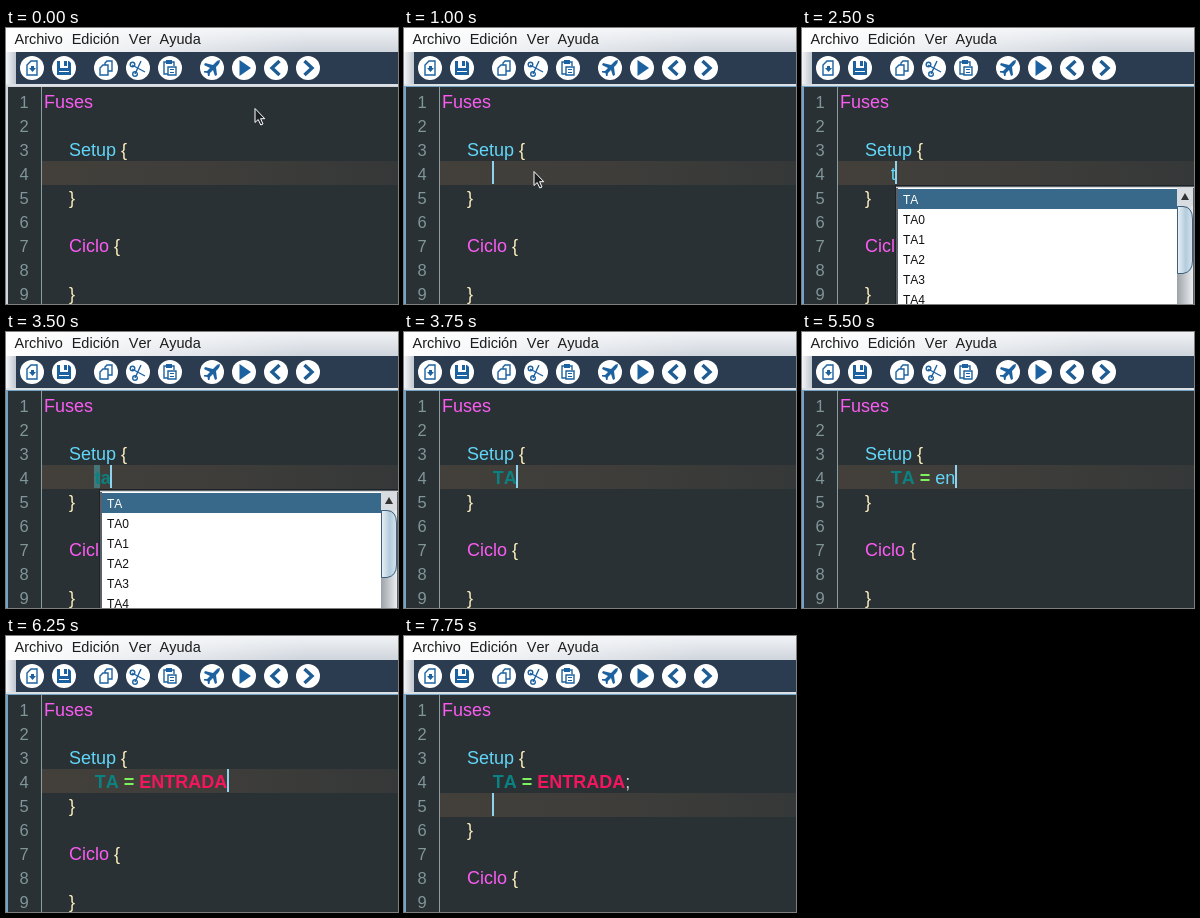
These frames come from a looping animation (392x276 px, 8 s). An HTML page:

```html
<!DOCTYPE html>
<html lang="es">
<head>
<meta charset="utf-8">
<title>Editor con autocompletado</title>
<style>
  html, body { margin: 0; width: 100%; height: 100%; overflow: hidden; background: #293134; }
  svg { display: block; width: 392px; height: 276px; font-family: "Liberation Sans", Arial, sans-serif; }
  text { font-kerning: none; white-space: pre; }
  .menu { font-size: 14.5px; fill: #1c1c1c; }
  .code { font-size: 18px; }
  .nums { font-size: 16.5px; fill: #81969a; text-anchor: end; }
  .list { font-size: 12px; fill: #111; }
  .key { fill: #fa5cf2; }
  .fn { fill: #62d6f8; }
  .brace { fill: #ffefbe; }
  .port { fill: #0b8281; font-weight: bold; }
  .op { fill: #7df25c; font-weight: bold; }
  .mode { fill: #f5155f; font-weight: bold; }
  .end { fill: #d3d8cf; }
  .solid { fill: #1d62a0; }
  .line { fill: none; stroke: #1d62a0; stroke-width: 1.4; }
  .bold { fill: none; stroke: #1d5c94; stroke-width: 3.4; }
</style>
</head>
<body>
<svg viewBox="0 0 392 276">
  <defs>
    <linearGradient id="bar" x2="0" y2="1">
      <stop offset="0" stop-color="#f0f2f5"/><stop offset=".5" stop-color="#e0e4e9"/><stop offset="1" stop-color="#ced4dc"/>
    </linearGradient>
    <linearGradient id="sheen">
      <stop offset="0" stop-color="#fff"/><stop offset="1" stop-color="#fff" stop-opacity="0"/>
    </linearGradient>
    <linearGradient id="grip">
      <stop offset="0" stop-color="#f4f5f7"/><stop offset="1" stop-color="#c0c7d0"/>
    </linearGradient>
    <linearGradient id="row">
      <stop offset="0" stop-color="#43403b"/><stop offset=".5" stop-color="#3e3d3a"/><stop offset="1" stop-color="#353838"/>
    </linearGradient>
    <linearGradient id="thumb">
      <stop offset="0" stop-color="#e9f0f5"/><stop offset=".55" stop-color="#b3cbdc"/><stop offset="1" stop-color="#d5e4ef"/>
    </linearGradient>
    <linearGradient id="track">
      <stop offset="0" stop-color="#9da2a8"/><stop offset="1" stop-color="#eceef0"/>
    </linearGradient>
  </defs>

  <!-- menu -->
  <rect width="392" height="24" fill="url(#bar)"/>
  <rect width="300" height="24" fill="url(#sheen)"/>
  <g class="menu">
    <text x="8.5" y="16">Archivo</text><text x="65.7" y="16">Edición</text>
    <text x="122.8" y="16">Ver</text><text x="153.6" y="16">Ayuda</text>
  </g>

  <!-- toolbar -->
  <rect y="24" width="392" height="32" fill="#2b3c50"/>
  <rect y="24" width="10" height="32" fill="url(#grip)"/>
  <g id="tools"></g>

  <!-- editor -->
  <rect y="56" width="392" height="220" fill="#293134"/>
  <rect id="current" y="133" x="36" width="356" height="24" fill="url(#row)"/>
  <rect x="35" y="59" width="1" height="217" fill="#8b9da1"/>
  <g id="nums" class="nums"></g>
  <rect id="mark" x="88" y="133" width="6" height="23" fill="#437579"/>
  <g class="code">
    <text x="38" y="80" class="key">Fuses</text>
    <text x="63" y="128"><tspan class="fn">Setup</tspan><tspan class="brace"> {</tspan></text>
    <text id="typed" x="88.7" y="152"></text>
    <g id="below">
      <text x="63" y="176" class="brace">}</text>
      <text x="63" y="224"><tspan class="key">Ciclo</tspan><tspan class="brace"> {</tspan></text>
      <text x="63" y="272" class="brace">}</text>
    </g>
  </g>
  <rect id="caret" width="2" height="23" fill="#8fd3ee"/>
  <rect y="56" width="392" height="2" fill="#dce1e6"/>
  <path id="frame" d="M0 58H392V59H2V276H0Z"/>

  <!-- completion list -->
  <g id="popup">
    <rect width="300" height="125" fill="#1d2327"/>
    <rect x="1" y="1" width="298" height="124" fill="#596067"/>
    <rect x="1" y="2" width="298" height="1" fill="#d3d7db"/>
    <rect x="3" y="3" width="295" height="122" fill="#fff"/>
    <rect x="3" y="4" width="279" height="20" fill="#39698a"/>
    <g id="items" class="list"></g>
    <rect x="282" y="3" width="16" height="122" fill="url(#track)"/>
    <rect x="282" y="3" width="16" height="18" fill="#d9dce0"/>
    <path d="M286 15l4-7 4 7z" fill="#333"/>
    <path d="M282.5 21.5H288Q297.5 22 297.5 34V76Q297.5 87 288 88.5H282.5Z" fill="url(#thumb)" stroke="#3b5f7d"/>
  </g>

  <path id="mouse" d="M0 0V14L3.2 11L5.8 16.5L8 15.5L5.6 10.2H9.8Z" fill="#1b1f22" stroke="#fff"/>
</svg>
<script>
const $ = id => document.getElementById(id);

// Icons are drawn around their own centre.
const icons = [
  [26, '<path class="line" d="M-1-7H5V7H-5V-3Z"/><path class="solid" d="M-1-2H2V0H4L.5 4L-3 0H-1Z"/>'],
  [58, '<path class="solid" d="M-7-7H-4V0H4V-7H5L7-5V7H-7Z"/><path class="solid" d="M0-7H3V-2H0Z"/><path fill="#fff" d="M-5 3H5V4H-5Z"/>'],
  [100, '<path class="line" d="M-1-3V-5L1-7H6V3H2M-3-3H2V7H-6V0Z"/>'],
  [132, '<path class="line" d="M-6-3L7 4M-3 6L3-7"/><circle class="line" cx="-5.5" cy="-3.5" r="2.3"/><circle class="line" cx="-3" cy="6" r="2.3"/>'],
  [164, '<path class="line" d="M-2 6H-6V-6H4V-2M-2-1H6V7H-2Z"/><path class="solid" d="M-4-8H2V-4H-4ZM0 1H4V2H0ZM0 4H4V5H0Z"/>'],
  [206, '<path class="solid" d="M8-8Q5-8 3-5L1-3L-7-5L-8-3L-2 0L-5 3L-8 3L-8 4.5L-4.5 5L-4 8L-2.5 8L-2 5L1 2L3 8L5 7L4-1L6-3Q8-5 8-8Z"/>'],
  [238, '<path class="solid" d="M-4.5-8L7 0L-4.5 8Z"/>'],
  [270, '<path class="bold" d="M3.5-7L-4 0L3.5 7"/>'],
  [302, '<path class="bold" d="M-3.5-7L4 0L-3.5 7"/>']
];
$('tools').innerHTML = icons.map(([x, art]) =>
  `<g transform="translate(${x} 40)"><circle r="12" fill="#fff"/>${art}</g>`).join('');

$('nums').innerHTML = Array.from({ length: 9 }, (_, i) =>
  `<text x="22.6" y="${80 + 24 * i}">${i + 1}</text>`).join('');

const span = (cls, s) => `<tspan class="${cls}">${s}</tspan>`;
const ta = span('port', 'TA');
const eq = ta + span('op', ' =');
const full = eq + span('mode', ' ENTRADA');
const ports = { x: 93, items: ['TA', 'TA0', 'TA1', 'TA2', 'TA3', 'TA4'] };
const modes = { x: 153, items: ['ENTRADA'] };

// start time, typed markup, caret x (0 = hidden), completion list
const steps = [
  [0, '', 0], [1000, '', 88], [1500, '', 0], [2000, '', 88],
  [2250, span('fn', 't'), 93],
  [2500, span('fn', 't'), 93, ports],
  [2750, span('fn', 't'), 0, ports],
  [3250, span('fn', 't'), 93, ports],
  [3500, span('port', 'ta'), 104, ports],
  [3750, ta, 112], [4250, ta, 0], [4500, ta, 117],
  [4750, eq, 128], [5000, eq, 133],
  [5250, eq + span('fn', ' e'), 143],
  [5500, eq + span('fn', ' en'), 153],
  [5750, eq + span('fn', ' en'), 153, modes],
  [6250, full, 221],
  [6750, full + span('end', ';'), 226],
  [7250, full + span('end', ';'), 0],
  [7500, full + span('end', ';'), 88]
];

const show = (el, on) => el.style.display = on ? '' : 'none';
const move = (el, x, y) => el.setAttribute('transform', `translate(${x} ${y})`);
let last = -1;

function draw(t) {
  const tick = Math.floor(t / 250) * 250;
  if (tick === last) return;
  last = tick;
  const [, markup, caret, list] = steps.findLast(s => s[0] <= tick);
  const drop = tick >= 7500 ? 24 : 0;

  $('typed').innerHTML = markup;
  move($('current'), 0, drop);
  move($('below'), 0, drop);
  show($('caret'), caret);
  move($('caret'), caret, 133 + drop);
  show($('mark'), tick === 3500);
  $('frame').setAttribute('fill', tick < 1000 ? '#d3d7db' : '#73a3c6');

  show($('popup'), list);
  if (list) {
    move($('popup'), list.x, 157);
    $('items').innerHTML = list.items.map((s, i) =>
      `<text x="8" y="${19 + 20 * i}"${i ? '' : ' fill="#fff"'}>${s}</text>`).join('');
  }

  const p = Math.min(tick / 1000, 1);
  show($('mouse'), tick < 1250);
  move($('mouse'), 249 - 119 * p, 80.5 + 63 * p);
}

const start = performance.now();
function loop() {
  draw((performance.now() - start) % 8000);
  requestAnimationFrame(loop);
}
loop();
</script>
</body>
</html>
```
